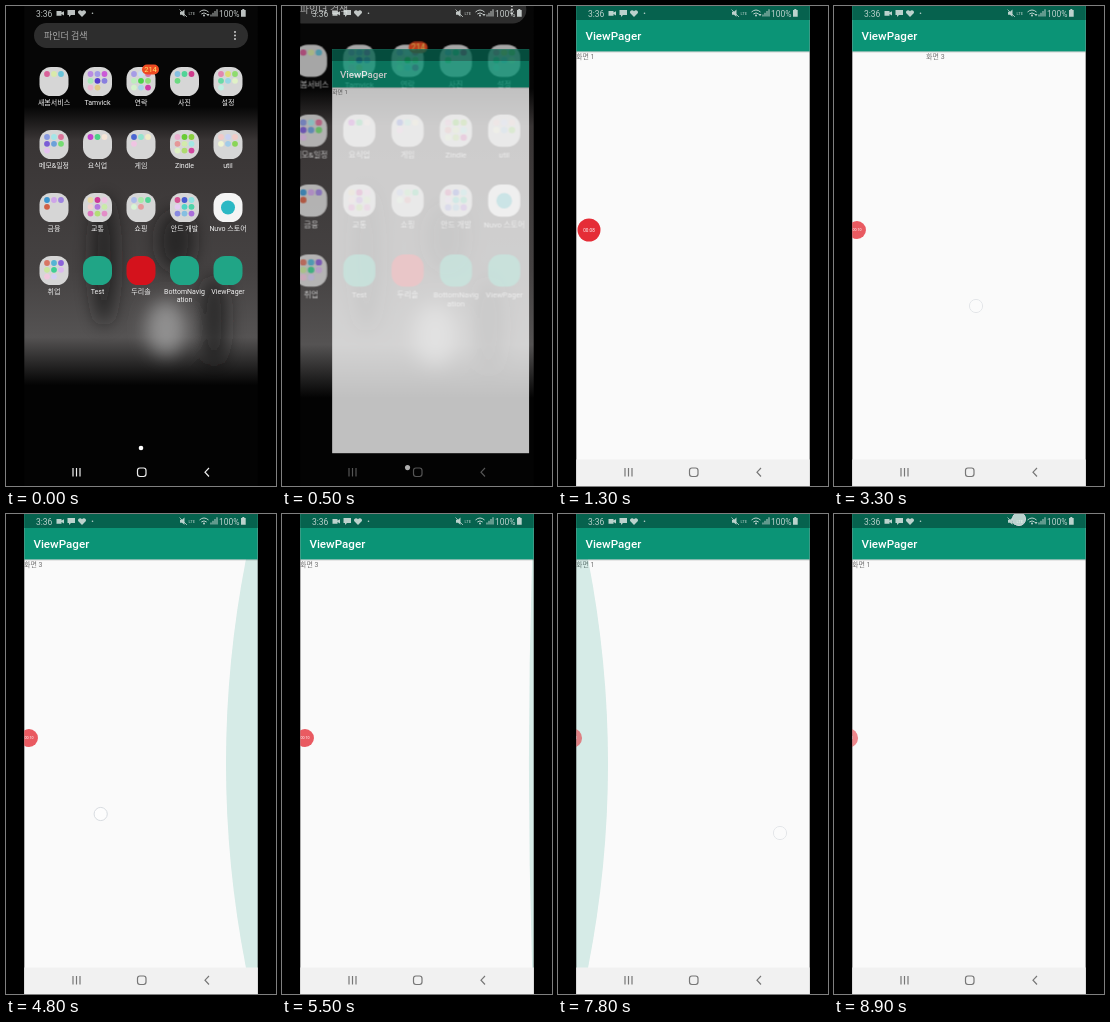
Write an HTML page that moves like this. It is 270 px wide and 480 px high and loops after 9000 ms.

```html
<!DOCTYPE html>
<html lang="ko">
<head>
<meta charset="utf-8">
<title>ViewPager</title>
<style>
  html, body { margin: 0; width: 100%; height: 100%; overflow: hidden; background: #000; }
  svg { display: block; width: 270px; height: 480px; }
  text { font-family: Roboto, "Noto Sans CJK KR", "Noto Sans CJK", sans-serif; }
  .label { font-size: 7px; fill: #f2f2f2; text-anchor: middle; }
  .page { font-size: 7px; fill: #757575; }
  .line { fill: none; stroke: currentColor; stroke-width: 1.2; }
</style>
</head>
<body>
<svg viewBox="0 0 270 480">
  <defs>
    <linearGradient id="wall" x2="0" y2="1">
      <stop offset=".21" stop-color="#060606"/>
      <stop offset=".28" stop-color="#393535"/>
      <stop offset=".55" stop-color="#454242"/>
      <stop offset=".69" stop-color="#555353"/>
      <stop offset=".79" stop-color="#030303"/>
    </linearGradient>
    <linearGradient id="shade" x2="0" y2="1">
      <stop offset="0" stop-color="#000" stop-opacity=".2"/>
      <stop offset="1" stop-color="#000" stop-opacity="0"/>
    </linearGradient>
    <filter id="blur" x="-1" y="-1" width="3" height="3"><feGaussianBlur stdDeviation="9"/></filter>
    <clipPath id="screen"><path d="M18.300 0H251.700V480H18.300Z"/></clipPath>
    <clipPath id="body"><path d="M18 45H252V454H18Z"/></clipPath>
    <path id="glow" d="M252 45H240Q200 250 240 454H252Z" fill="#0a9478" fill-opacity=".15"/>
  </defs>

  <g clip-path="url(#screen)">
    <g id="home">
      <rect x="18" width="234" height="480" fill="url(#wall)"/>
      <g filter="url(#blur)">
        <ellipse cx="98" cy="255" rx="13" ry="65" fill="#1c1a1a" opacity=".7"/>
        <ellipse cx="170" cy="235" rx="18" ry="30" fill="#1c1a1a" opacity=".7"/>
        <ellipse cx="208" cy="315" rx="14" ry="45" fill="#1c1a1a" opacity=".7"/>
        <ellipse cx="160" cy="322" rx="20" ry="28" fill="#aaa" opacity=".7"/>
      </g>
      <rect x="28" y="17" width="214" height="25" rx="12.5" fill="#2d2d2d"/>
      <text x="38" y="32.500" font-size="9" fill="#a9a9a9">파인더 검색</text>
      <path d="M229 26V33.500" stroke="#ccc" stroke-width="2" stroke-linecap="round" stroke-dasharray="0 3.500"/>
      <g id="apps"></g>
      <circle id="dot" cx="135" cy="442" r="2.300" fill="#fff"/>
    </g>

    <g id="app">
      <rect x="18" width="234" height="480" fill="#fafafa"/>
      <g clip-path="url(#body)">
        <g id="pages"></g>
        <use id="glowR" href="#glow"/>
        <use id="glowL" href="#glow"/>
      </g>
      <rect x="18" y="45" width="234" height="2.500" fill="url(#shade)"/>
      <rect x="18" width="234" height="45.400" fill="#0b9476"/>
      <rect x="18" width="234" height="14" fill="#06624e"/>
      <text x="27.400" y="34" font-size="11.600" font-weight="500" fill="#fff">ViewPager</text>
    </g>

    <rect id="navBg" x="18" y="453.500" width="234" height="26.500" fill="#f1f1f1"/>
    <g id="nav" class="line">
      <path d="M67 462V470.500M70.500 462V470.500M74 462V470.500"/>
      <rect x="131.500" y="462" width="8.500" height="8.500" rx="2.400"/>
      <path d="M203 462L199 466.200L203 470.500"/>
    </g>

    <g fill="#e4ebe9" font-size="8.500" opacity=".82">
      <text x="30" y="10.600">3:36</text>
      <path d="M50.500 5H55.500V6.600L58 5.200V9.400L55.500 8V9.800H50.500Z"/>
      <path d="M61.500 4H69V9H65L63 11V9H61.500Z"/>
      <path d="M76 11L72.300 7.300C70.800 4.800 74.500 2.800 76 5.300C77.500 2.800 81.200 4.800 79.700 7.300Z"/>
      <circle cx="86.500" cy="7.300" r=".8"/>
      <path d="M174 5.700H176L178.500 3.500V10.800L176 8.700H174Z"/>
      <path d="M173.500 3.500L181 11" stroke="#e4ebe9" stroke-width=".8"/>
      <text x="182.500" y="9" font-size="4.200">LTE</text>
      <path d="M193.500 6Q198 2 202.500 6M195.300 8Q198 5.800 200.700 8" fill="none" stroke="#e4ebe9"/>
      <circle cx="198" cy="9.600" r="1"/>
      <path id="traffic" d="M200.500 8H203.500L202 10.300Z"/>
      <path d="M205 10.500V8.500M207 10.500V6.800M209 10.500V5M211 10.500V3.300" stroke="#e4ebe9"/>
      <text x="213" y="10.600">100%</text>
      <path d="M235 4H236.300V3H238.300V4H239.700V10.800H235Z"/>
    </g>

    <g id="rec">
      <circle r="11.500" fill="#e52d37"/>
      <text id="clock" y="1.600" font-size="4.600" fill="#fff" text-anchor="middle"></text>
    </g>
    <circle id="touch" r="6.600" fill="#fff" fill-opacity=".72" stroke="#cdd2d8"/>
  </g>
</svg>

<script>
const LOOP = 9000, STEP = 100, PAGE = 234, LAST = 2;
const $ = id => document.getElementById(id);
const put = (id, name, value) => $(id).setAttribute(name, value);
const span = (t, a, b) => Math.min(1, Math.max(0, (t - a) / (b - a)));
const smooth = p => p * p * (3 - 2 * p);
const easeOut = p => 1 - (1 - p) ** 2;

// Launcher: folders hold seeded dots, the other tiles are plain
const names = ['새봄서비스', 'Tamvick', '연락', '사진', '설정',
  '메모&amp;일정', '요식업', '게임', 'Zindle', 'util',
  '금융', '교통', '쇼핑', '안드 개발', 'Nuvo 스토어',
  '취업', 'Test', '두리솔', 'BottomNavig|ation', 'ViewPager'];
const teal = '#20a586';
const plain = { 'Nuvo 스토어': '#f4f4f4', Test: teal, 두리솔: '#d4121c', 'BottomNavig|ation': teal, ViewPager: teal };
const badge = `<rect x="1" y="-17" width="17" height="10" rx="5" fill="#ee4b22"/>
  <text x="9.500" y="-9.200" font-size="7.500" fill="#ffe36a" text-anchor="middle">214</text>`;

let seed = 7;
const random = () => (seed = seed * 16807 % 2147483647) / 2147483647;

function dots() {
  let s = '';
  const n = 3 + Math.floor(random() * 7);
  for (let i = 0; i < n; i++) {
    const x = (i % 3 - 1) * 7, y = Math.floor(i / 3) * 6.8 - 7.5;
    s += `<circle cx="${x}" cy="${y}" r="2.900" fill="hsl(${random() * 360} 60% ${50 + random() * 40}%)"/>`;
  }
  return s;
}

$('apps').innerHTML = names.map((name, i) => {
  const x = 48 + i % 5 * 43.5, y = 75.5 + Math.floor(i / 5) * 63;
  const tile = `<rect x="-14.500" y="-14.500" width="29" height="29" rx="11.500" fill="${plain[name] || '#d6d6d6'}"/>`;
  const mark = name === 'Nuvo 스토어' ? '<circle r="7" fill="#2bb8c4"/>' : plain[name] ? '' : dots();
  const label = name.split('|').map((s, k) => `<text class="label" y="${23.8 + k * 8}">${s}</text>`).join('');
  return `<g transform="translate(${x} ${y})">${tile}${mark}${name === '연락' ? badge : ''}${label}</g>`;
}).join('');

$('pages').innerHTML = [1, 2, 3].map((n, i) =>
  `<text class="page" x="${18 + i * PAGE}" y="53">화면 ${n}</text>`).join('');

// Finger path of each swipe; past the first or last page it makes the edge glow
const swipes = [
  { at: 1900, ms: 600, from: 212, to: 95 },
  { at: 2700, ms: 900, from: 215, to: 142 },
  { at: 4700, ms: 900, from: 150, to: 70 },
  { at: 5700, ms: 700, from: 90, to: 205 },
  { at: 6600, ms: 800, from: 95, to: 210 },
  { at: 7600, ms: 800, from: 95, to: 222 }
];

function gesture(t) {
  const g = { page: 0, right: 0, left: 0, finger: null };
  let page = 0;
  for (const { at, ms, from, to } of swipes) {
    const dir = Math.sign(from - to), p = span(t, at, at + ms);
    const over = page + dir < 0 || page + dir > LAST;
    if (over) {
      g[dir > 0 ? 'right' : 'left'] = Math.min(1, p * 9) * (1 - span(p, .3, 1));
    } else {
      page += dir;
      g.page += dir * smooth(span(t, at + STEP, at + ms));
    }
    const held = ms * (over ? 1 / 4 : 2 / 3);
    if (t >= at && t <= at + held) {
      const q = (t - at) / held;
      g.finger = { x: from + (to - from) * easeOut(q), y: dir > 0 ? 300 : 319, alpha: 1 - q / 2 };
    }
  }
  if (t >= 100 && t <= 300) g.finger = { x: 222, y: 263, alpha: 1 };
  if (t >= 8900) g.finger = { x: 185, y: 5, alpha: 1 };
  return g;
}

const zoom = (k, y) => `translate(221 ${y}) scale(${k}) translate(-221 ${-y})`;
const stretch = (x, k) => `translate(${x} 0) scale(${k} 1) translate(-252 0)`;

function draw(t) {
  const open = easeOut(span(t, 300, 800));
  put('home', 'transform', zoom(1 + .172 * open, 264));
  put('home', 'visibility', open < 1 ? 'visible' : 'hidden');
  put('apps', 'opacity', 1 - .35 * open);
  put('dot', 'opacity', 1 - .5 * open);
  put('app', 'transform', zoom(.56 + .44 * open, 273));
  put('app', 'opacity', Math.min(1, open * 1.2));
  put('navBg', 'opacity', span(t, 500, 800));
  put('nav', 'color', t < 400 ? '#eee' : t < 600 ? '#555' : '#777');
  put('traffic', 'opacity', t < 4000 || t >= 8600 ? 1 : 0);

  const g = gesture(t);
  put('pages', 'transform', `translate(${-g.page * PAGE} 0)`);
  put('glowR', 'transform', stretch(252, g.right));
  put('glowL', 'transform', stretch(18, -g.left));

  // The recorder button docks, then slips behind the edge
  const dock = span(t, 1900, 2200), hide = span(t, 5700, 6000);
  put('rec', 'transform', `translate(${31 - 8 * dock - 8.5 * hide} 224) scale(${1 - .22 * dock + .05 * hide})`);
  put('rec', 'opacity', span(t, 700, 900) * (1 - .22 * dock - .22 * hide));
  const sec = 7 + Math.floor((Math.min(t, 3300) - 300) / 1000);
  $('clock').textContent = '00:' + String(sec).padStart(2, '0');

  const f = g.finger;
  put('touch', 'opacity', f ? f.alpha : 0);
  if (f) put('touch', 'transform', `translate(${f.x} ${f.y})`);
}

const start = performance.now();
function tick() {
  const t = performance.now() - start + 30;
  draw(Math.floor(t % LOOP / STEP) * STEP);
  requestAnimationFrame(tick);
}
tick();
</script>
</body>
</html>
```
